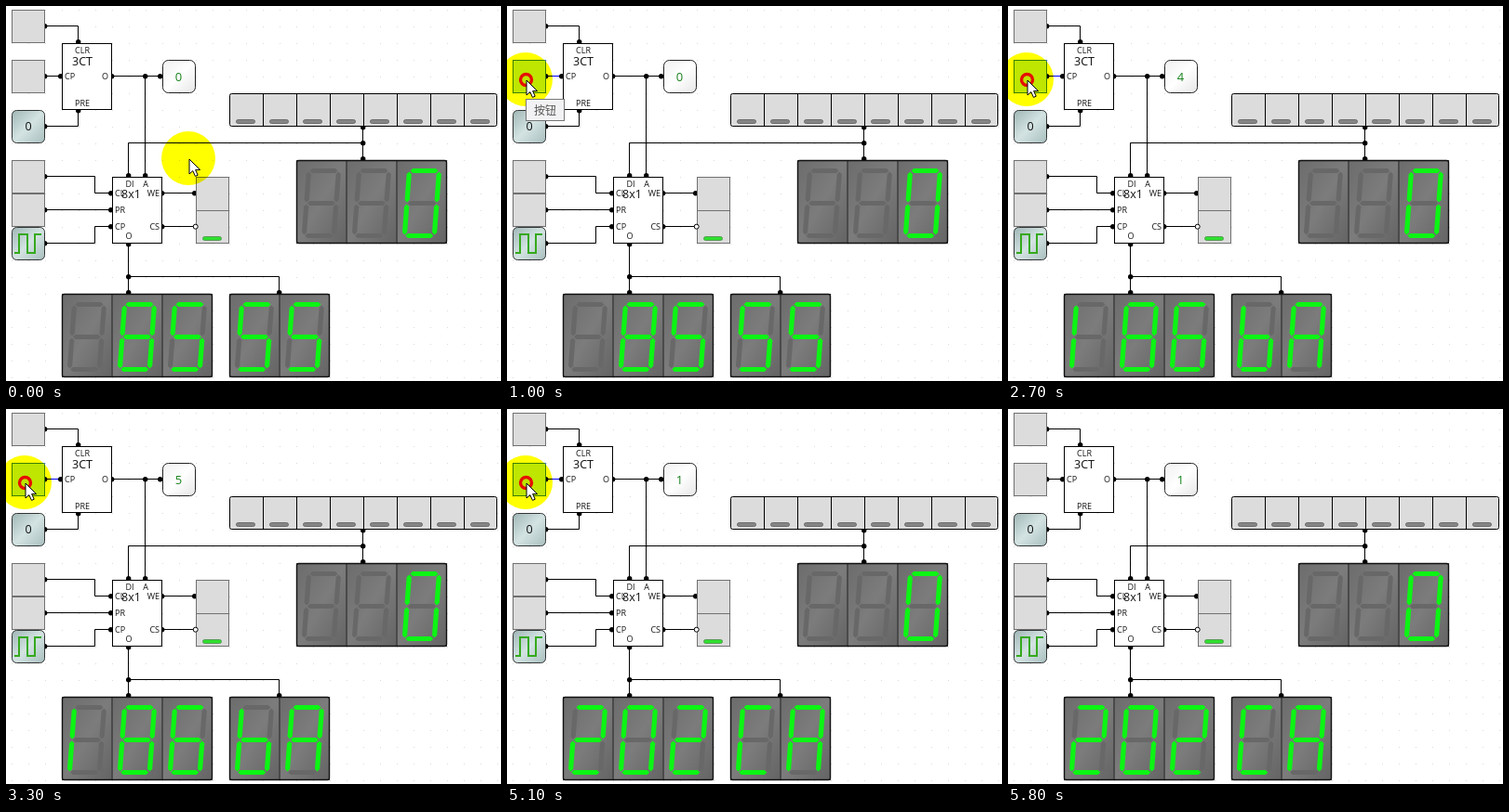
These frames come from a looping animation (532 by 404 pixels, 6500 ms). An HTML page:

```html
<!DOCTYPE html>
<html lang="en">
<head>
<meta charset="utf-8">
<title>Counter and memory circuit</title>
<style>
html, body { margin: 0; width: 100%; height: 100%; overflow: hidden; background: #fff; }
svg { display: block; width: 532px; height: 404px; isolation: isolate; }
text { font-family: "Open Sans", "Noto Sans", sans-serif; fill: #111; }
#halo { mix-blend-mode: multiply; }
</style>
</head>
<body>
<svg id="stage" viewBox="0 0 532 404" xmlns="http://www.w3.org/2000/svg">
  <defs>
    <pattern id="grid" x="6" y="4" width="18" height="18" patternUnits="userSpaceOnUse">
      <rect width="1" height="1" fill="#dcdcdc"/>
    </pattern>
    <linearGradient id="panel" x1="0" y1="0" x2="1" y2="1">
      <stop offset="0" stop-color="#6c6c6c"/>
      <stop offset=".5" stop-color="#7c7c7c"/>
      <stop offset="1" stop-color="#646464"/>
    </linearGradient>
    <linearGradient id="source" x1="0" y1="0" x2="1" y2="1">
      <stop offset="0" stop-color="#9fb6b6"/>
      <stop offset=".5" stop-color="#d3e3e2"/>
      <stop offset="1" stop-color="#a9bfbf"/>
    </linearGradient>
    <linearGradient id="probe" x1="0" y1="0" x2="1" y2="1">
      <stop offset="0" stop-color="#f0f0f0"/>
      <stop offset=".5" stop-color="#fff"/>
      <stop offset="1" stop-color="#e6e6e6"/>
    </linearGradient>
  </defs>
  <rect width="532" height="404" fill="#fff"/>
  <rect width="532" height="404" fill="url(#grid)"/>
  <g id="board"></g>
  <circle id="halo" r="29" fill="#ff0"/>
  <g id="tip">
    <rect x="20.5" y="100.5" width="41" height="23" fill="#f2f2f4" stroke="#767676"/>
    <text x="41" y="116.5" text-anchor="middle" font-size="12"
      style="font-family:'Noto Sans CJK SC','Noto Sans CJK',sans-serif;fill:#575757">按钮</text>
  </g>
  <g id="mouse">
    <circle id="ring" cx="-.5" cy="-.5" r="6" fill="none" stroke="#e60f00" stroke-width="3.4"/>
    <path d="M0 0V16L3.8 12.6 6.5 18.4 9.2 17.2 6.6 11.6H11.6Z" fill="#fff" stroke="#000"/>
  </g>
</svg>
<script>
const board = document.getElementById("board");
const byId = id => document.getElementById(id);

function add(tag, attrs, parent = board) {
  const el = document.createElementNS("http://www.w3.org/2000/svg", tag);
  for (const key in attrs) el.setAttribute(key, attrs[key]);
  parent.appendChild(el);
  return el;
}
const box = (x, y, w, h, fill, stroke = "#000", rx = 0) =>
  add("rect", { x: x + .5, y: y + .5, width: w, height: h, fill, stroke, rx });
const wire = d =>
  add("path", { d, fill: "none", stroke: "#000", transform: "translate(-.5 -.5)" });
const dot = (x, y, r = 2.7) => add("circle", { cx: x - .3, cy: y - .3, r });
function label(text, x, y, size = 9, anchor = "middle") {
  const el = add("text", { x, y, "font-size": size, "text-anchor": anchor });
  el.textContent = text;
  return el;
}

// Wires and junctions
["M42 22H78V40", "M42 130H78V112", "M114 76H168", "M150 76V184",
 "M132 184V148H384", "M384 130V166", "M42 184H96V202H114", "M42 220H114",
 "M42 256H96V238H114", "M168 202H204", "M168 238H204",
 "M132 256V310", "M132 292H294V310"].forEach(wire);
const clockWire = wire("M42 76H60");
[[150, 76], [384, 148], [132, 292],
 [42, 22], [78, 39], [59, 76], [114, 76], [166, 76], [42, 130], [78, 113],
 [132, 183], [150, 183], [42, 184], [42, 220], [42, 256],
 [113, 202], [113, 220], [113, 238], [168, 202], [168, 238], [203, 202],
 [132, 257], [132, 309], [294, 309], [384, 131], [384, 165]].forEach(p => dot(...p));
const clockPin = dot(42, 76);

// Inputs on the left
const GREY = "#dcdcdc", EDGE = "#707070";
const [, button] = [4, 58, 166, 202].map(y => box(6, y, 35, 35, GREY, EDGE));
box(6, 112, 35, 35, "url(#source)", "#333", 5);
label("0", 24, 134, 12.5);
box(6, 238, 35, 35, "url(#source)", "#333", 5);
add("path", { d: "M9 266H14V246H23V266H31V246H38", fill: "none", stroke: "#35a91c", "stroke-width": 2 });

// Counter
box(60, 40, 53, 71, "#fff");
label("CLR", 82, 51);
label("3CT", 82, 63.5, 12.5);
label("CP", 63, 79, 9, "start");
label("O", 110, 79, 9, "end");
label("PRE", 82, 107.5);
box(168, 58, 35, 35, "url(#probe)", "#222", 6);
const countText = label("0", 185.5, 80.5, 13);
countText.style.fill = "#17801c";

// Memory
box(114, 184, 53, 71, "#fff");
label("DI", 133, 195);
label("A", 150, 195);
label("CL", 117, 205, 9, "start");
label("8x1", 134.5, 207, 12.5);
label("PR", 117, 223, 9, "start");
label("CP", 117, 241, 9, "start");
label("WE", 165, 205, 9, "end");
label("CS", 165, 241, 9, "end");
label("O", 132, 251);
box(204, 184, 35, 36, GREY, EDGE);
box(204, 220, 35, 35, GREY, EDGE);
box(211, 248, 20, 4, "#2fe02f", "#5a9a5a", 2);
add("circle", { cx: 203.7, cy: 237.7, r: 2.5, fill: "#fff", stroke: "#000" });

// Switch row
box(240, 94, 287, 35, GREY, "#000", 2);
for (let i = 0; i < 8; i++) {
  const x = 240 + 36 * i;
  if (i) wire(`M${x + 1} 95V130`);
  box(x + 7, 122, 20, 4, "#858585", "#6c6c6c", 2);
}

// Seven-segment displays; each digit leans to the right
const SEGMENTS = {
  "0": "abcdef", "1": "ef", "2": "abdeg", "5": "acdfg", "6": "acdefg",
  "7": "abc", "8": "abcdefg", "A": "abcefg", "B": "cdefg", "C": "adef", " ": ""
};
const LINES = {
  a: [0, 0, 1, 0], b: [1, 0, 1, 1], c: [1, 1, 1, 2], d: [0, 2, 1, 2],
  e: [0, 1, 0, 2], f: [0, 0, 0, 1], g: [0, 1, 1, 1]
};
function segmentPath([x1, y1, x2, y2]) {
  const at = (x, y) => [13.5 + 32 * x - 2.6 * y, 11.5 + 35 * y];
  const [ax, ay] = at(x1, y1), [bx, by] = at(x2, y2);
  const len = Math.hypot(bx - ax, by - ay);
  const ux = (bx - ax) / len, uy = (by - ay) / len;
  const pt = (along, side) =>
    `${(ax + ux * along - uy * side).toFixed(2)} ${(ay + uy * along + ux * side).toFixed(2)}`;
  return "M" + [pt(1, 0), pt(3.6, 2.6), pt(len - 3.6, 2.6), pt(len - 1, 0),
    pt(len - 3.6, -2.6), pt(3.6, -2.6)].join("L") + "Z";
}
function display(x, y, size) {
  const cells = [];
  for (let i = 0; i < size; i++) {
    const cell = add("g", { transform: `translate(${x + 54 * i} ${y})` });
    add("rect", { x: .5, y: .5, width: 53, height: 89, fill: "url(#panel)", stroke: "#4a4a4a" }, cell);
    add("circle", { cx: 45, cy: 81.5, r: 3, fill: "#6a6a6a" }, cell);
    const parts = {};
    for (const key in LINES) parts[key] = add("path", { d: segmentPath(LINES[key]) }, cell);
    cells.push(parts);
  }
  add("rect", { x: x + .5, y: y + .5, width: 54 * size - 1, height: 89, rx: 2,
    fill: "none", stroke: "#111", "stroke-width": 1.4 });
  return value => [...value.padStart(size)].forEach((ch, i) => {
    for (const key in LINES)
      cells[i][key].setAttribute("fill", SEGMENTS[ch].includes(key) ? "#0cf514" : "#686868");
  });
}
display(312, 166, 3)("0");
const showDecimal = display(60, 310, 3);
const showHex = display(240, 310, 2);

// Timeline
const LOOP = 6500, STEP = 100;
const MEMORY = [0x55, 0xCA, 0xAA, 0xBA, 0xBA, 0xBA, 0xBA, 0xBA];
const PRESSES = [1000, 1600, 2200, 2700, 3300, 3700, 4100, 4500, 5100];
const START = [197, 165], REST = [21, 80], EXIT = [110, 418];
const ease = p => p * p * (3 - 2 * p);
const clamp = p => Math.max(0, Math.min(1, p));
const mix = (a, b, p) => a.map((v, i) => v + (b[i] - v) * p);

function pointer(t) {
  return t < 5300
    ? mix(START, REST, ease(clamp(t / 700)))
    : mix(REST, EXIT, ease(clamp((t - 5200) / 550)));
}
function holdTime(start) {
  return start === 2700 ? 300 : 200;
}

function draw(time) {
  const t = Math.floor(time % LOOP / STEP) * STEP;
  const [x, y] = pointer(t);
  const visible = t < 5800;
  const pressed = PRESSES.some(s => t >= s && t < s + holdTime(s));
  const hover = visible && x >= 6 && x <= 42 && y >= 58 && y <= 94;
  // The first press registers one step late
  const count = PRESSES.filter((s, i) => t >= s + (i ? 0 : STEP)).length % 8;
  const value = MEMORY[count];

  countText.textContent = count;
  showDecimal(String(value));
  showHex(value.toString(16).toUpperCase());

  button.setAttribute("fill", hover ? "#bee6fd" : GREY);
  button.setAttribute("stroke", hover ? "#3c7fb1" : EDGE);
  clockWire.setAttribute("stroke", pressed ? "#00f" : "#000");
  clockPin.setAttribute("fill", pressed ? "#00c" : "#000");

  byId("halo").setAttribute("cx", x - 1);
  byId("halo").setAttribute("cy", y - 1);
  byId("mouse").setAttribute("transform", `translate(${x} ${y})`);
  for (const id of ["halo", "mouse"]) byId(id).style.display = visible ? "" : "none";
  byId("ring").style.display = pressed ? "" : "none";
  byId("tip").style.display = t >= 900 && t < 1200 ? "" : "none";
}

const begin = performance.now();
function tick() {
  draw(Math.max(0, performance.now() - begin));
  requestAnimationFrame(tick);
}
tick();
</script>
</body>
</html>
```
